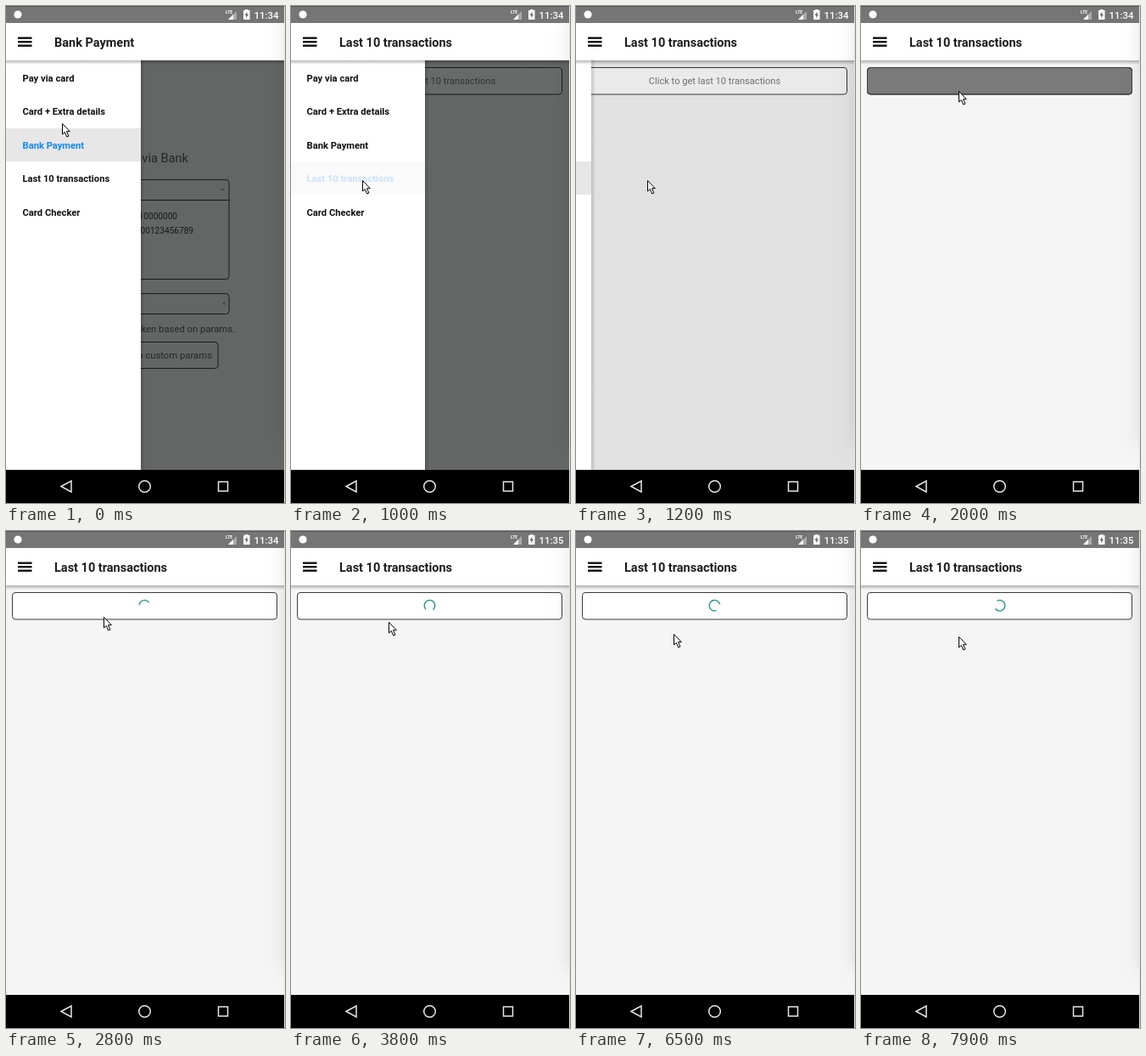
These frames come from a looping animation (329 by 585 pixels, 8000 ms). An HTML page with a canvas:

```html
<!DOCTYPE html>
<html lang="en">
<head>
<meta charset="utf-8">
<title>Payment app drawer</title>
<style>
  html, body { margin: 0; width: 100%; height: 100%; overflow: hidden; background: #fff; }
  canvas { display: block; }
</style>
</head>
<body>
<canvas id="stage" width="329" height="585"></canvas>
<script>
const ctx = document.getElementById('stage').getContext('2d');
const LOOP = 8000, STEP = 100;
const MENU = ['Pay via card', 'Card + Extra details', 'Bank Payment', 'Last 10 transactions', 'Card Checker'];
const ARROW = 'M0 0V12.5L2.8 10 5.2 15.5 7.4 14.6 5 9.2H8.8Z';
const BOLT = 'M284.5 6.5L281.5 11H283.4L283 14.5 286 9.8H284.2Z';

const clamp = x => Math.min(1, Math.max(0, x));
const smooth = x => x * x * (3 - 2 * x);
const progress = (t, from, to) => clamp((t - from) / (to - from));

function rect(x, y, w, h, fill) {
  ctx.fillStyle = fill;
  ctx.fillRect(x, y, w, h);
}

function text(str, x, y, size, color, weight = 400, align = 'left') {
  ctx.font = `${weight} ${size}px Roboto, sans-serif`;
  ctx.textAlign = align;
  ctx.fillStyle = color;
  ctx.fillText(str, x, y);
}

function shape(path, fill, stroke, width = 1) {
  const p = typeof path === 'string' ? new Path2D(path) : path;
  if (fill) { ctx.fillStyle = fill; ctx.fill(p); }
  if (stroke) { ctx.strokeStyle = stroke; ctx.lineWidth = width; ctx.stroke(p); }
}

function arc(x, y, r, from = 0, to = 360) {
  const p = new Path2D();
  p.arc(x, y, r, from * Math.PI / 180, to * Math.PI / 180);
  return p;
}

function box(x, y, w, h, fill) {
  const p = new Path2D();
  p.roundRect(x, y, w, h, 3.5);
  shape(p, fill, '#3a3a3a');
}

function shade(x0, y0, x1, y1, alpha) {
  const g = ctx.createLinearGradient(x0, y0, x1, y1);
  g.addColorStop(0, `rgba(0,0,0,${alpha})`);
  g.addColorStop(1, 'rgba(0,0,0,0)');
  return g;
}

function bankPage() {
  const label = (str, right, y, size, color = '#555') => text(str, right, y, size, color, 400, 'right');
  label('Pay via Bank', 215, 184, 14.6);
  box(65.5, 204.5, 197.5, 117);
  rect(66, 228, 197, 1, '#333');
  label('10000000', 202, 251, 10.1, '#333');
  label('000123456789', 221, 268, 10.1, '#333');
  box(65.5, 338.5, 197.5, 24);
  shape('M253.5 215l2 2 2-2M258 348.5l-1.5 1.5 1.5 1.5', null, '#444');
  label('Get token based on params.', 270, 384, 11.3);
  box(77.5, 395.5, 172.5, 31);
  label('Token with custom params', 243, 415, 11.3);
}

// Indeterminate ring: the head grows in the first half of a cycle, the tail catches up in the second
function spinner(t) {
  const cycle = (t - 3800) / 1333 + .5;
  const u = cycle - Math.floor(cycle);
  const base = 135 + 144 * (cycle - .5) + 90 * (u - .5);
  const tail = base + 270 * smooth(clamp(2 * u - 1));
  const head = base + 270 * smooth(clamp(2 * u)) + 8;
  shape(arc(163.5, 87.7, 6.3, tail, head), null, '#25938a', 1.4);
}

function transactionsPage(t) {
  const button = fill => box(7.5, 72.5, 312, 31.5, fill);
  const dim = .52 * clamp(1 - Math.abs(t - 2000) / 300);
  button('#fff');
  if (t < 2000) text('Click to get last 10 transactions', 163.5, 92, 11.1, '#777', 400, 'center');
  if (t >= 2100) spinner(t);
  if (dim) button(`rgba(0,0,0,${dim})`);
}

function drawer(t) {
  const open = (1 - progress(t, 1000, 1300)) ** 2;
  if (!open) return;
  const edge = Math.round((t < 100 ? 158.5 : 157.5) * open);
  const pressed = t === 1000;
  const selected = t < 1000 ? 2 : 3;
  rect(0, 64, 328, 482, `rgba(2,8,4,${.6 * open ** .9})`);
  rect(edge, 64, 5, 482, shade(edge, 0, edge + 5, 0, .16));
  rect(0, 64, edge, 482, '#fff');
  MENU.forEach((label, i) => {
    const y = Math.round(64.5 + i * 39.5);
    const active = i === selected;
    ctx.globalAlpha = active && pressed ? .2 : 1;
    if (active) rect(0, y, edge, 39, '#e7e7e7');
    text(label, edge - 139.5, y + 24, 11.2, active ? '#1089f5' : '#111', 700);
    ctx.globalAlpha = 1;
  });
}

function header(t) {
  rect(0, 64, 328, 5, shade(0, 64, 0, 69, .28));
  rect(0, 20, 328, 44, '#fff');
  for (let i = 0; i < 3; i++) rect(14, 36.5 + i * 4.5, 16.5, 2.4, '#111');
  text(t < 1000 ? 'Bank Payment' : 'Last 10 transactions', 57, 47.7, 14.5, '#1c1c1c', 700);
}

// Soft shadow cast from just beyond the right edge
function edgeShadow() {
  ctx.save();
  ctx.shadowColor = 'rgba(0,0,0,.1)';
  ctx.shadowBlur = 20;
  rect(328, 10, 40, 505, '#fff');
  ctx.restore();
}

function statusBar(t) {
  rect(0, 0, 328, 20, '#757575');
  rect(0, 0, 328, 1, '#555');
  shape(arc(14, 10, 4.6), '#fff');
  shape('M262 16L272 6V16Z', '#aaa');
  shape('M262 16L268 10V16Z', '#fff');
  text('LTE', 259, 9, 5, '#fff', 700);
  rect(280, 5, 7.5, 11, '#fff');
  rect(282, 4, 3.5, 1, '#fff');
  shape(BOLT, '#666');
  text(t < 3200 ? '11:34' : '11:35', 292.5, 14.5, 11.4, '#fff', 500);
}

function navBar() {
  rect(0, 546, 328, 39, '#000');
  shape('M65 565.5L77 559V572Z', null, '#e8e8e8', 1.5);
  shape(arc(163.5, 565.5, 6.8), null, '#e8e8e8', 1.5);
  shape('M250.5 560H261.5V571H250.5Z', null, '#e8e8e8', 1.5);
}

// Browse the menu, tap an entry, tap the button, then drift down
function pointerAt(t) {
  if (t < 100) return [66, 138];
  if (t < 1300) {
    const y = t < 500 ? 184 + 48 * progress(t, 100, 500) : 232 - 27 * progress(t, 500, 800);
    return [84, y];
  }
  const move = progress(t, 1300, 1800);
  const drift = 7 * progress(t, 2700, 3700) + 12 * progress(t, 4500, 5400) + 5 * progress(t, 5400, 7900);
  return [84 + 31 * move, 205 - 105 * move + drift];
}

function pointer(t) {
  const [x, y] = pointerAt(t).map(Math.round);
  ctx.save();
  ctx.translate(x + .5, y + .5);
  shape(ARROW, '#fff', '#000');
  ctx.restore();
}

function draw(now) {
  const t = Math.floor(now % LOOP / STEP) * STEP;
  rect(0, 0, 329, 585, '#f5f5f5');
  if (t < 1000) bankPage(); else transactionsPage(t);
  drawer(t);
  header(t);
  edgeShadow();
  statusBar(t);
  navBar();
  rect(328, 0, 1, 585, '#e4e4e4');
  pointer(t);
}

const start = performance.now();
function frame() {
  draw(performance.now() - start);
  requestAnimationFrame(frame);
}
frame();
</script>
</body>
</html>
```
